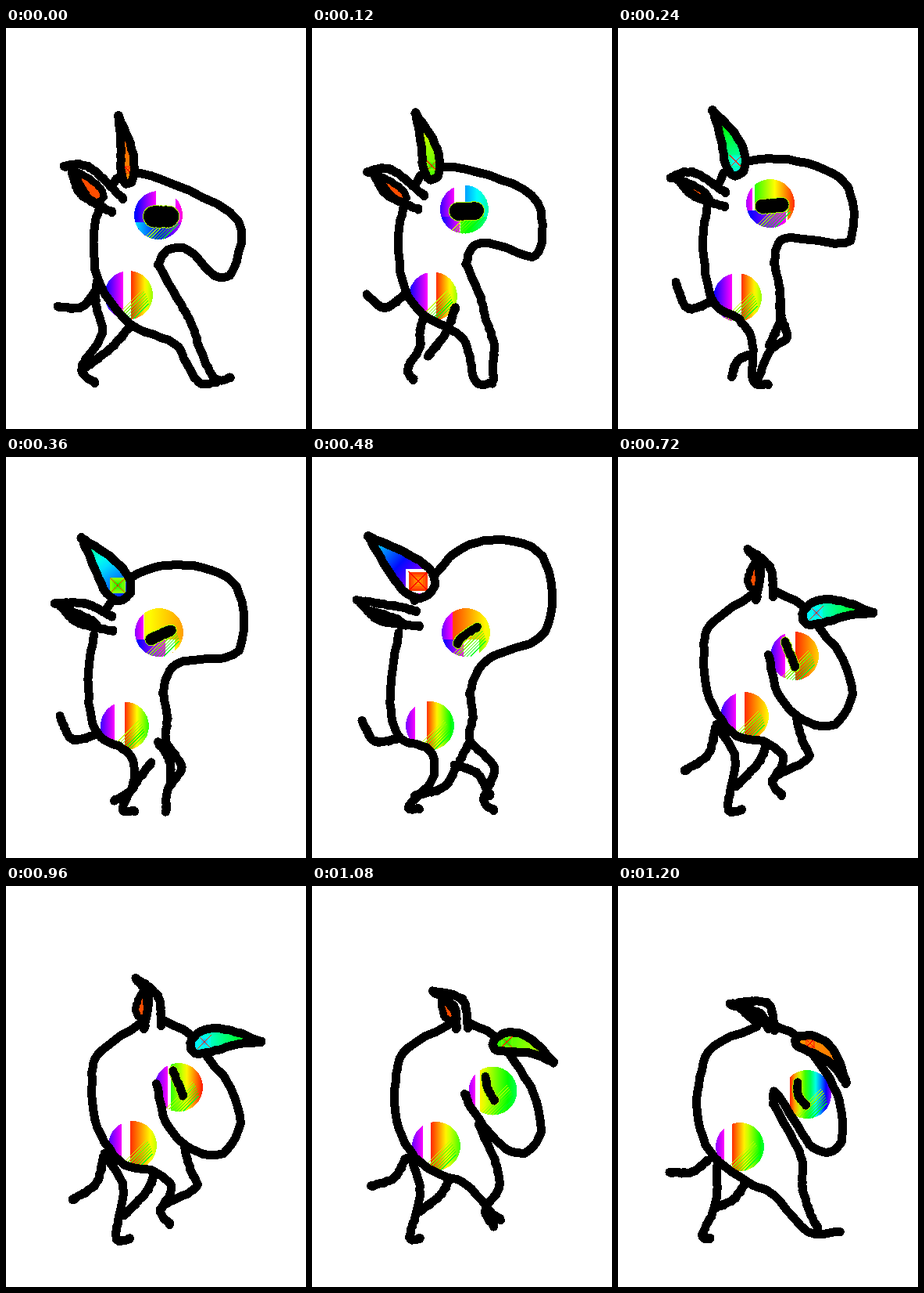
Write an HTML page that moves like this. It is 384 px wide and 512 px high and loops after 1680 ms.

```html
<!DOCTYPE html>
<html lang="en">
<head>
<meta charset="utf-8">
<title>Rainbow unicorn</title>
<style>
html, body { margin: 0; width: 100%; height: 100%; overflow: hidden; background: #fff; }
svg { display: block; width: 100vw; height: 100vh; }
</style>
</head>
<body>
<svg id="stage" viewBox="0 0 384 512" shape-rendering="crispEdges"></svg>
<script>
const STEP = 120, LOOP = 1680, R = 31, INK = 11, SAMPLES = 40;
const LINES = ['body', 'rear', 'rear2', 'tail', 'front', 'head', 'ear', 'flick'];

// Strokes are key points of smooth curves.
// horn, lobe: tip x, y, base x, y, half width, bend.
// hornHues: tip, base, box. Disk colours: white gap start, end (%), hue after it, last hue.
const stand = {
  head: '134,203 146,190 172,186 235,208 298,246 295,298 282,318 262,313 235,284 207,283 195,302',
  front: '195,302 222,350 238,378 250,415 268,448 288,446',
  body: '120,228 113,262 118,322 160,378 214,402 232,430 248,453 270,452',
  rear: '117,322 115,352 123,390 97,434 114,453',
  rear2: '160,380 135,408 104,432',
  tail: '66,356 97,356 117,332',
  ear: '74,177 105,177 150,218',
  flick: '84,182 97,213 136,235',
  pupil: '189,241 208,241', width: 26,
  horn: [144, 112, 156, 199, 9, -4], hornHues: [15, 35, 35],
  lobe: [86, 180, 122, 220, 10, 0],
  eye: [195, 239], eyeTop: [45, 85, 295, 310], eyeLow: [0, 0, 185, 285],
  belly: [157, 341], bellyHues: [38, 55, 10, 85]
};
const crouch = {
  head: '128,202 138,183 165,171 205,167 250,175 285,192 300,220 300,258 290,275 225,268 205,275 200,300',
  front: '200,300 207,332 208,365 216,395 195,412 177,454',
  body: '114,230 109,280 121,348 155,372 172,402 173,450 193,455',
  rear: '170,417 153,425 146,445',
  rear2: '207,335 208,370 194,405',
  tail: '74,325 90,358 122,348',
  ear: '67,192 95,184 138,210',
  flick: '74,190 97,214 137,228',
  pupil: '184,228 210,226', width: 17,
  horn: [121, 105, 154, 188, 14, -6], hornHues: [100, 175, 180],
  lobe: [78, 192, 116, 220, 6, 0],
  eye: [195, 224], eyeTop: [13, 18, 110, 10], eyeLow: [82, 85, 30, 20],
  belly: [153, 344], bellyHues: [38, 58, 10, 85]
};
const lean = {
  head: '131,184 165,142 182,124 210,109 246,106 282,115 303,145 306,198 290,232 235,253 212,273 202,302',
  front: '202,302 206,330 203,362 233,397 220,437 233,451',
  body: '111,225 103,275 101,325 115,360 150,374 155,410 124,446 138,449',
  rear: '202,364 185,396 168,422 132,432',
  rear2: '182,394 210,403 228,432',
  tail: '64,337 81,363 112,359',
  ear: '57,183 105,190 134,197',
  flick: '60,184 88,209 138,216',
  pupil: '186,239 192,230 212,217', width: 10,
  horn: [72, 101, 152, 173, 22, 0], hornHues: [175, 300, 32],
  lobe: [72, 195, 118, 214, 4, 0],
  eye: [197, 224], eyeTop: [22, 22, 15, 65], eyeLow: [45, 78, 90, 60],
  belly: [151, 343], bellyHues: [20, 43, 10, 135]
};
const rear = {
  head: '142,162 160,149 210,147 290,170 326,195 343,240 328,292 300,307 245,290 215,278 209,292',
  front: '209,292 205,335 201,380 190,397 130,395',
  body: '124,205 107,245 107,320 116,356 156,376 143,386',
  rear: '142,392 128,398 123,416',
  rear2: '180,402 166,436 152,402 166,446 183,449',
  tail: '69,379 97,379 115,358',
  ear: '84,140 98,156 138,170',
  flick: '84,140 100,166 142,193',
  pupil: '212,223 230,228 246,238', width: 10,
  horn: [206, 71, 179, 177, 22, 4], hornHues: [200, 300, 22],
  lobe: [87, 155, 130, 194, 9, 0],
  eye: [231, 229], eyeTop: [0, 10, 215, 285], eyeLow: [0, 32, 10, 60],
  belly: [147, 336], bellyHues: [0, 0, 285, 0]
};
const charge = {
  head: '202,172 240,192 262,225 285,252 300,300 282,338 255,343 225,327 203,297 193,252',
  front: '228,332 236,362 243,385 199,411 210,432',
  body: '176,173 120,213 110,250 118,310 150,355 188,364 212,384 199,411',
  rear: '126,342 150,385 141,440 144,453 159,450',
  rear2: '190,368 180,390 152,420',
  tail: '85,401 115,380 125,345',
  ear: '166,118 194,140 199,178',
  flick: '166,118 182,142 177,182',
  pupil: '214,236 227,268', width: 10,
  horn: [327, 199, 236, 204, 15, 7], hornHues: [105, 190, 192],
  lobe: [178, 130, 174, 169, 8, 2],
  eye: [226, 254], eyeTop: [30, 52, 10, 50], eyeLow: [30, 52, 10, 50],
  belly: [162, 331], bellyHues: [32, 50, 10, 60]
};
const glance = {
  ...charge, eye: [221, 257], eyeTop: [28, 34, 110, 5], eyeLow: [28, 34, 110, 5], bellyHues: [28, 45, 10, 75]
};
const bow = {
  head: '203,180 232,194 270,245 286,285 286,325 270,340 247,332 225,298 201,262 199,278',
  front: '199,278 234,345 236,385 245,415 256,437',
  body: '178,180 122,205 105,245 102,290 118,340 165,378 200,395 243,441 285,441',
  rear: '127,350 125,405 108,445 118,450',
  rear2: '163,380 148,400 124,411',
  tail: '66,366 95,365 115,350',
  ear: '143,151 190,149 201,184',
  flick: '143,151 180,164 193,182',
  pupil: '230,251 231,268 241,280', width: 10,
  horn: [292, 252, 228, 195, 11, 13], hornHues: [25, 35, 35],
  lobe: [153, 153, 187, 172, 7, 0],
  eye: [242, 266], eyeTop: [0, 14, 5, 275], eyeLow: [0, 14, 5, 275],
  belly: [156, 333], bellyHues: [17, 34, 10, 135]
};

const KEYS = [[0, stand], [240, crouch], [480, lean], [600, rear], [720, charge], [960, glance], [1200, bow]]
  .map(([time, pose]) => [time, Object.fromEntries(
    Object.entries(pose).map(([name, v]) => [name, typeof v === 'string' ? smooth(v) : v]))]);

// Catmull-Rom curve through the key points.
function smooth(text) {
  const pts = text.split(' ').map(p => p.split(',').map(Number));
  const last = pts.length - 1;
  return Array.from({ length: SAMPLES + 1 }, (_, s) => {
    const u = s / SAMPLES * last, i = Math.min(Math.floor(u), last - 1), t = u - i;
    const [a, b, c, d] = [-1, 0, 1, 2].map(o => pts[Math.max(0, Math.min(last, i + o))]);
    return [0, 1].map(n => b[n] + .5 * t * (c[n] - a[n] +
      t * (2 * a[n] - 5 * b[n] + 4 * c[n] - d[n] + t * (3 * (b[n] - c[n]) + d[n] - a[n]))));
  });
}

function blend(a, b, k) {
  if (typeof a === 'number') return a + (b - a) * k;
  if (Array.isArray(a)) return a.map((v, i) => blend(v, b[i], k));
  return Object.fromEntries(Object.keys(a).map(name => [name, blend(a[name], b[name], k)]));
}

function poseAt(time) {
  const next = KEYS.findIndex(([t]) => t > time);
  if (next < 0) return KEYS[KEYS.length - 1][1];
  const [t0, a] = KEYS[next - 1], [t1, b] = KEYS[next];
  return blend(a, b, (time - t0) / (t1 - t0));
}

// Point on the bent axis of a teardrop, t = 0 at the tip, shifted sideways by side.
function along([x0, y0, x1, y1, , bend], t, side = 0) {
  const dx = x1 - x0, dy = y1 - y0;
  const off = (bend * Math.sin(Math.PI * t) + side) / Math.hypot(dx, dy);
  return [x0 + dx * t - dy * off, y0 + dy * t + dx * off];
}

function teardrop(shape) {
  return Array.from({ length: SAMPLES + 1 }, (_, i) => {
    const a = i / SAMPLES * Math.PI, t = (1 - Math.cos(2 * a)) / 2;
    const half = 1.6 * shape[4] * t * Math.sqrt(1 - t ** 4);
    return along(shape, t, i < SAMPLES / 2 ? -half : half);
  });
}

const rough = i => Math.sin(i * i * 12.9 + i * 78.2) * .6;
const path = pts => 'M' + pts.map(([x, y], i) => `${(x + rough(i)).toFixed(1)} ${(y + rough(i + 7)).toFixed(1)}`).join('L');
const hsl = hue => `hsl(${hue} 100% 50%)`;
const ink = (d, width = INK, color = '#000', fill = 'none') =>
  `<path d="${d}" fill="${fill}" stroke="${color}" stroke-width="${width}" stroke-linecap="round" stroke-linejoin="round"/>`;

function gradient(id, [x1, y1], [x2, y2], stops) {
  return `<linearGradient id="${id}" gradientUnits="userSpaceOnUse" x1="${x1}" y1="${y1}" x2="${x2}" y2="${y2}">` +
    stops.map(([at, color]) => `<stop offset="${at}%" stop-color="${color}"/>`).join('') + '</linearGradient>';
}

const spectrum = (start, end, from, to) => Array.from({ length: 9 }, (_, i) =>
  [blend(start, end, i / 8), hsl(blend(from, to, i / 8))]);

function bands([gap, after, from, to]) {
  const left = gap > 0 ? spectrum(0, gap, Math.max(235, 300 - 1.6 * gap), 300) : [];
  const white = after > gap ? [[gap, '#fff'], [after, '#fff']] : [];
  return [...left, ...white, ...spectrum(after, 100, from, to)];
}

function disk(id, [x, y], top, low = top) {
  const cut = 9, half = Math.sqrt(R * R - cut * cut), ends = [[x - R, y], [x + R, y]];
  let out = gradient(id, ...ends, bands(top)) + gradient(id + 'Low', ...ends, bands(low)) +
    `<circle cx="${x}" cy="${y}" r="${R}" fill="url(#${id})"/>` +
    `<path d="M${x - half} ${y + cut}A${R} ${R} 0 0 0 ${x + half} ${y + cut}Z" fill="url(#${id}Low)"/>`;
  for (let d = 8; d < 28; d += 3) {
    const h = Math.sqrt(R * R - d * d) * .7, m = d * .7;
    out += ink(`M${x + m - h} ${y + m + h}L${x + m + h * .6} ${y + m - h * .6}`, 1, hsl(50 + d * 3));
  }
  return out;
}

function crossBox([x, y], size, hue) {
  const square = (s, fill) => `<rect x="${x - s / 2}" y="${y - s / 2}" width="${s}" height="${s}" fill="${fill}"/>`;
  const h = size / 2;
  let out = size > 20 ? square(size + 7, '#fff') : '';
  for (let i = 0; i < 4; i++) out += square(size * (1 - i / 4), hsl(hue - 18 + i * 8));
  return out + ink(`M${x - h} ${y - h}l${size} ${size}m0 ${-size}l${-size} ${size}`, 1, hsl(hue > 90 ? 10 : 0));
}

function picture(pose) {
  const { horn, hornHues: [tipHue, baseHue, boxHue] } = pose;
  const pupil = path(pose.pupil), hornPath = path(teardrop(horn));
  return disk('belly', pose.belly, pose.bellyHues) +
    disk('eye', pose.eye, pose.eyeTop, pose.eyeLow) +
    ink(pupil, pose.width + 2, hsl(80)) + ink(pupil, pose.width) +
    ink(path(teardrop(pose.lobe)), 9, '#000', hsl(18)) +
    LINES.map(name => ink(path(pose[name]))).join('') +
    gradient('horn', horn.slice(0, 2), horn.slice(2, 4), spectrum(0, 100, tipHue, baseHue)) +
    `<path d="${hornPath}" fill="url(#horn)"/>` +
    crossBox(along(horn, .8), horn[4] * 1.1, boxHue) + ink(hornPath);
}

const stage = document.getElementById('stage');
let shown = -1;

function render(time) {
  const step = Math.floor(time % LOOP / STEP);
  if (step !== shown) stage.innerHTML = picture(poseAt(step * STEP));
  shown = step;
}

const start = performance.now();
function tick() {
  render(performance.now() - start);
  requestAnimationFrame(tick);
}
tick();
</script>
</body>
</html>
```
